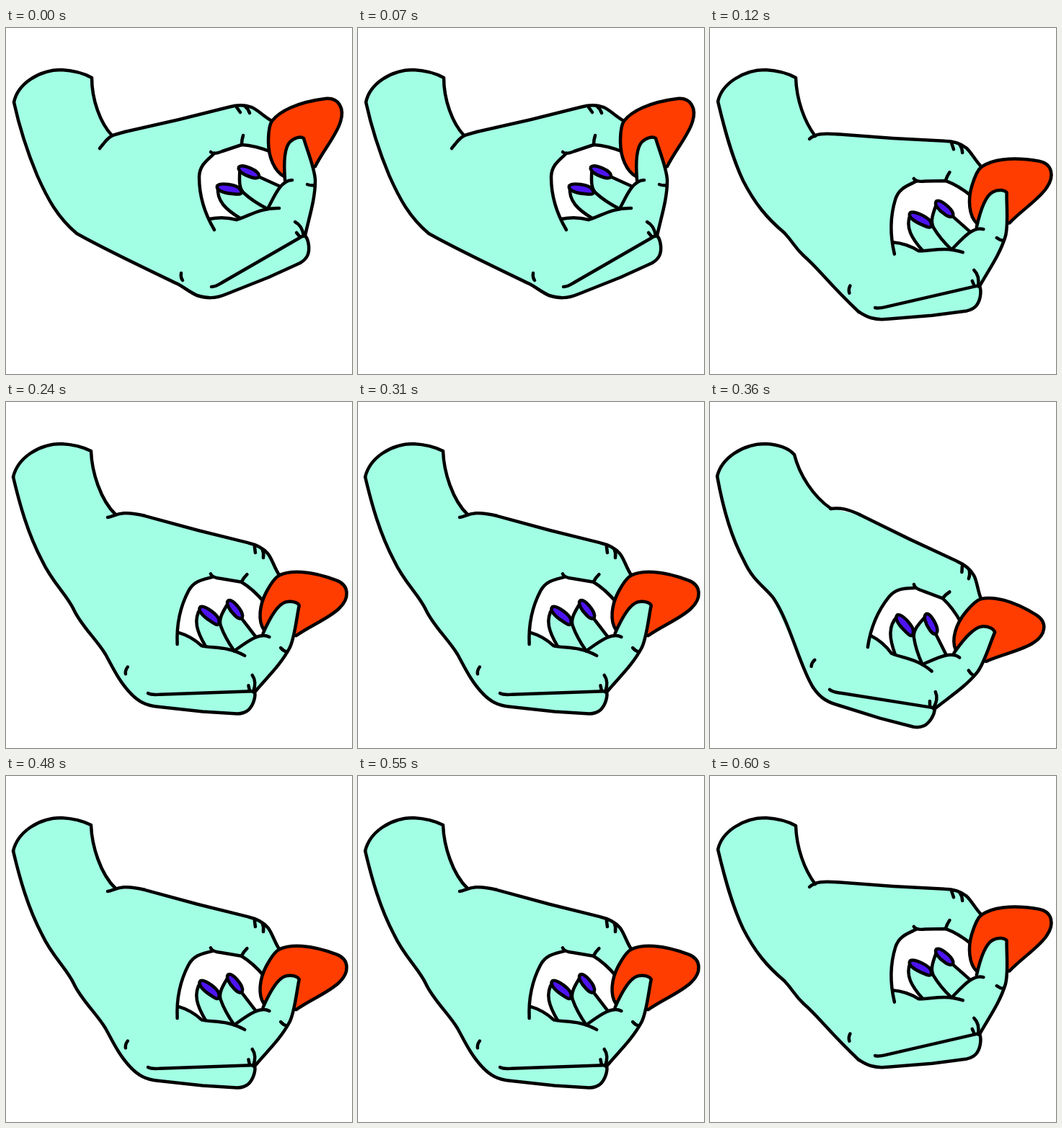
An HTML page with a canvas that plays this animation: 480x480 px, repeating every 720 ms.

```html
<!DOCTYPE html>
<html lang="en">
<head>
<meta charset="utf-8">
<title>Hand</title>
<style>
html, body { margin: 0; width: 100%; height: 100%; overflow: hidden; background: #fff; }
canvas { display: block; width: 480px; height: 480px; }
</style>
</head>
<body>
<canvas id="stage" width="480" height="480"></canvas>
<script>
const ctx = document.getElementById('stage').getContext('2d');
const SKIN = '#a2ffe4', EGG = '#ff3d00', NAIL = '#4d14f0';
const STEP = 120;
const ORDER = [0, 1, 2, 3, 2, 1];
const path = d => new Path2D(d);

// The hand is rigid: it turns about the start of the palm crease (285,359).
// The forearm flexes, so each pose has its own edges.
const poses = [
  {
    x: 285, y: 359, turn: 0,
    top: 'C95,59 110,64 119,69 C119,100 131,132 147,149',
    wrist: 'M130,167 C137,158 143,150 151,148 L165,144',
    low: 'M11,103 C18,135 28,168 43,204 C58,238 72,263 98,285 C135,306 190,332 240,356 C250,362 256,367 265,371'
  },
  {
    x: 229, y: 388, turn: 17,
    top: 'C95,59 110,64 119,69 C120,100 131,130 146,150',
    wrist: 'M138,154 C146,146 158,146 177,147.3',
    low: 'M11,102 C20,140 30,178 46,212 C62,243 78,263 103,284 C117,299 117,304 130,316 C152,335 162,352 206.5,394'
  },
  {
    x: 197, y: 404, turn: 28,
    top: 'C95,59 110,64 118,68 C119,97 131,136 152,156',
    wrist: 'M141,160 C151,159 157,149 192,157.8',
    low: 'M10,104 C19,142 30,182 50,220 C64,250 84,267 94,288 C104,310 126,330 138,350 C148,368 157,388 173.7,405'
  },
  {
    x: 166, y: 399, turn: 39,
    top: 'C95,59 109,64 117,73 C124,101 143,131 168,148',
    wrist: 'M167,148 C181,146 192,149 208,156.4',
    low: 'M10,103 C17,142 28,185 47,220 C60,249 76,256 88,272 C112,308 124,366 143,396'
  }
].map(p => {
  const corner = p.low.split(' ')[0].slice(1);
  const cuff = `M${corner} C16,78 45,58 77,58 ${p.top}`;
  const join = p.wrist.split(/[ L]/).pop();
  const end = p.low.split(' ').pop();
  return {
    ...p,
    fill: path(`${cuff} L${join} L${end} L${corner} ${p.low.replace('M', 'L')} Z`),
    lines: [cuff, p.wrist, p.low].map(path)
  };
});

const knuckles = 'M165,144 L240,127 L310,109.5 C319,107 331,106 341,110 C350,114 358,123 369,129';
const heel = 'C278,375 290,376 306,369 L364,346 L408,326 C418,320 421,313 420,302 Q419,293 415,288';
const palm = path(knuckles + ' L386,206 L428,215 L415,288 L265,371 ' + heel + ' L265,371 L150,260 Z');
const palmLines = [
  knuckles,
  'M265,371 ' + heel,
  'M285,359 C291,359 295,356 300,353 L411,289',
  'M243,340 Q242,346 245,350',
  'M320,110 L325,117',
  'M331,108 Q336,112 338,118',
  'M401,269 C409,273 412,281 413,289',
  'M403,284 L408,290'
].map(path);

const hole = path('M289,174 C280,183 268,190 268,207 C268,233 275,252 282,265 C296,262 309,263 320,266 ' +
  'C335,262 350,254 363,251 C370,237 378,220 390,212 L386,206 L368,172 Q346,163 327,162 L300,171 Z');
const holeLines = [
  'M289,174 C280,183 268,190 268,207 C268,235 276,258 289,280',
  'M284,172 Q288,176 300,171 L327,162 Q346,163 368,172',
  'M327,162 Q327,155 329,149'
].map(path);

const lowEdge = 'M294,220 C292,240 305,252 325,264';
const lowFinger = path(lowEdge + ' L363,251 L329,229 Z');
const highFinger = path('M363,251 C353,246 342,240 330,229 C322,221 324,208 324.5,194 L350,206 L383,221');
const nails = [
  'M293,219 C297,214 321,217 325,224 C330,232 322,231 314,230 C302,229 291,225 293,219 Z',
  'M323,193 C327,188 346,196 350,202 C354,209 346,209 340,207 C330,204 321,198 323,193 Z'
].map(path);
const webLines = [
  'M282,265 C296,262 309,263 320,266 C335,262 352,249 379,250',
  'M363,251 C372,234 381,211 397,211'
].map(path);
const web = path('M363,251 C372,234 381,211 397,211 L400,250 Z');

const egg = path('M369,129 C379,116 403,103 443,98 C462,96 470,112 464,130 ' +
  'C459,148 440,170 429,192 L386,206 C372,199 364,178 364,158 C364,145 365,135 369,129 Z');
const thumbEdge = 'M387,211 C385,185 387,165 394,158 C400,152 409,150 413,153 ' +
  'C417,168 429,196 429,212 C429,238 420,264 415,288';
const thumb = path(thumbEdge + ' L395,250 Z');
const thumbLines = [thumbEdge, 'M418,217 Q423,219 428,218'].map(path);

function fill(shape, color) {
  ctx.fillStyle = color;
  ctx.fill(shape);
}

function ink(lines) {
  for (const line of lines) ctx.stroke(line);
}

function solid(shape, color) {
  fill(shape, color);
  ctx.stroke(shape);
}

function drawHand() {
  fill(palm, SKIN);
  fill(hole, '#fff');
  fill(lowFinger, SKIN);
  ink([path(lowEdge)]);
  solid(highFinger, SKIN);
  for (const nail of nails) solid(nail, NAIL);
  ink(holeLines);
  solid(egg, EGG);
  fill(web, SKIN);
  fill(thumb, SKIN);
  ink(webLines);
  ink(thumbLines);
  ink(palmLines);
}

function draw(pose) {
  ctx.fillStyle = '#fff';
  ctx.fillRect(0, 0, 480, 480);
  ctx.lineWidth = 4.5;
  ctx.lineCap = ctx.lineJoin = 'round';
  ctx.strokeStyle = '#000';

  fill(pose.fill, SKIN);
  ctx.save();
  ctx.translate(pose.x, pose.y);
  ctx.rotate(pose.turn * Math.PI / 180);
  ctx.translate(-285, -359);
  drawHand();
  ctx.restore();
  ink(pose.lines);
}

const start = performance.now();
function tick() {
  const t = Math.max(0, performance.now() - start);
  draw(poses[ORDER[Math.floor(t / STEP) % ORDER.length]]);
  requestAnimationFrame(tick);
}
tick();
</script>
</body>
</html>
```
